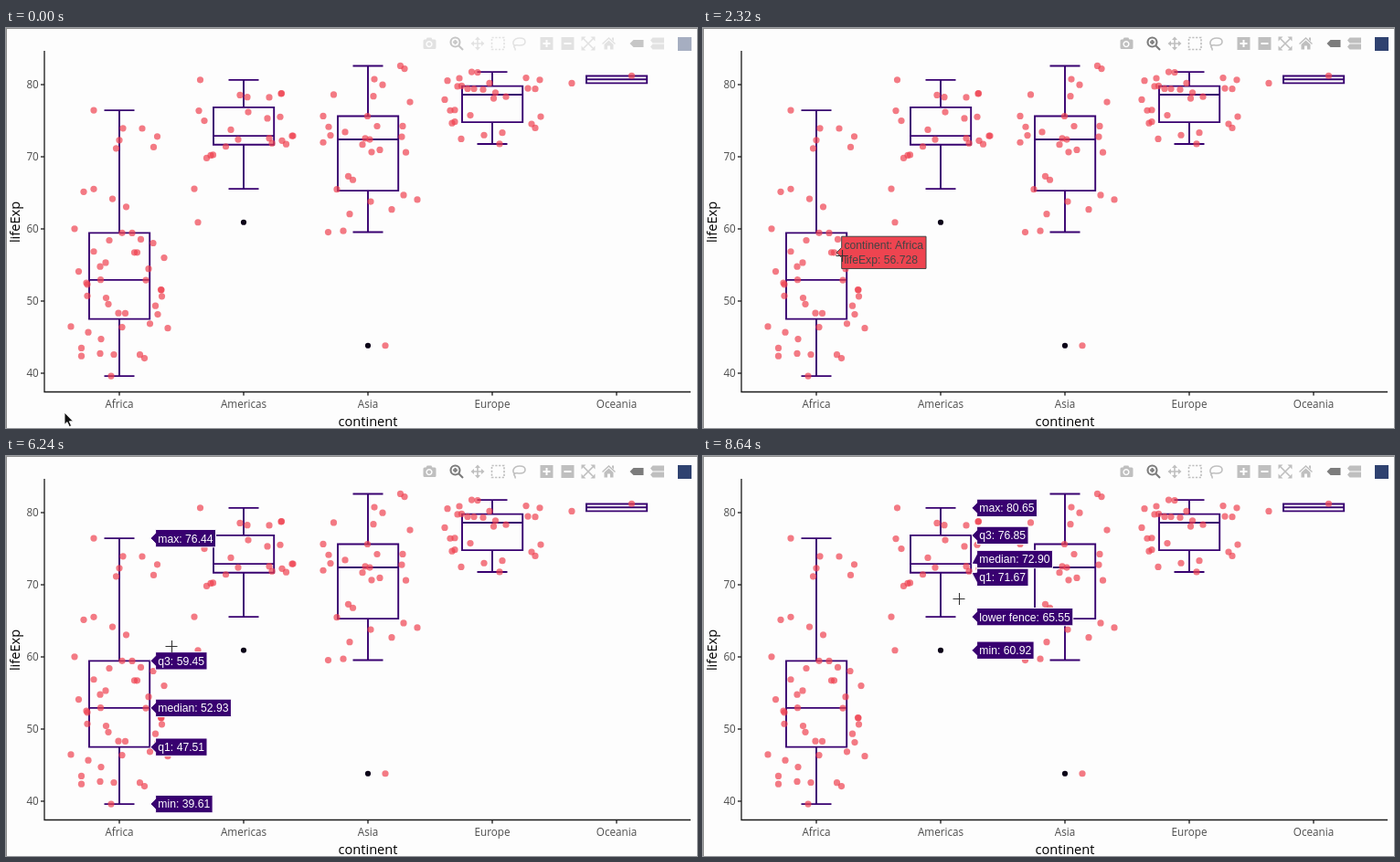
An HTML page that plays this animation: 756x438 px, repeating every 8.72 s.

```html
<!DOCTYPE html>
<html lang="en">
<head>
<meta charset="utf-8">
<title>Life expectancy by continent</title>
<style>
  html, body { margin: 0; width: 100%; height: 100%; overflow: hidden; background: #fdfdfd; }
  svg { display: block; }
  .tick { font: 11.7px "Open Sans", sans-serif; fill: #4d4d4d; }
  .title { font: 14.6px "Open Sans", sans-serif; fill: #000; }
  .mid { text-anchor: middle; }
  .end { text-anchor: end; }
  .tip { font: 12.2px "Liberation Sans", Arial, sans-serif; }
  .axis { stroke: #1a1a1a; stroke-width: 1.3; fill: none; }
  .box { stroke: #380070; stroke-width: 1.9; fill: none; }
  .dot { fill: #ee4250; fill-opacity: .7; }
  .icon { fill: #bfbfbf; stroke: none; }
  .icon .line { fill: none; stroke: #bfbfbf; stroke-width: 1.6; }
  .icon .on { fill: #7c7c7c; }
  .icon .on.line { fill: none; stroke: #7c7c7c; stroke-width: 2.1; }
  .icon .cut { fill: none; stroke: #fdfdfd; stroke-width: 2; }
</style>
</head>
<body>
<svg id="stage" width="756" height="438" viewBox="0 0 756 438">
  <path d="M0 .5H756M.5 0V438" stroke="#8c8c8c" fill="none"/>
  <g id="plot"></g>
  <g id="bar" class="icon">
    <path fill-rule="evenodd" d="M457 12.5h2.5l1.2-2h4.6l1.2 2h2.5q1.5 0 1.5 1.5v7.5q0 1.5-1.5 1.5h-11q-1.5 0-1.5-1.5v-7.5q0-1.5 1.5-1.5zM463 14a3.6 3.6 0 1 0 .01 0zm0 1.5a2.1 2.1 0 1 1-.01 0z"/>
    <circle class="line on" cx="491.5" cy="15.5" r="5"/>
    <path class="line on" d="M495 19l5 5M489 15.5h5M491.5 13v5"/>
    <path class="line" d="M510 17h12M516 11v12"/>
    <path d="M508.500 17l3.500-3v6zM523.500 17l-3.500-3v6zM516 9.500l-3 3.500h6zM516 24.500l-3-3.500h6z"/>
    <rect class="line" x="531.5" y="10.500" width="13.500" height="13" stroke-dasharray="2.200 1.600"/>
    <path class="line" d="M557 20c-4-3-2-9 5-9 8 0 8 8 0 8-3 0-5-1-6 .5-1 2 2 2 1 5"/>
    <path d="M584.500 10h14v14h-14zM607.500 10h14v14h-14z"/>
    <path class="cut" d="M587.500 17h8M591.500 13v8M610.500 17h8"/>
    <path d="M629.500 9.500h5l-5 5zM644.500 9.500h-5l5 5zM629.500 24.500h5l-5-5zM644.500 24.500h-5l5-5z"/>
    <path class="line" d="M632 12l10 10M642 12l-10 10"/>
    <path d="M659.500 10l7.500 7-1 1-6.500-6-6.500 6-1-1zM654.500 18l5-4.500 5 4.500v5.500h-3.500v-4h-3v4h-3.500zM663 10.500h2v4l-2-2z"/>
    <path class="on" d="M682.500 17l4-4h11v8h-11z"/>
    <path d="M705 13.500l2.500-3h12.500v6h-12.500zM705 20.500l2.500-3h12.500v6h-12.500z"/>
    <rect x="735" y="10" width="15" height="15" fill="#2f4270"/>
  </g>
  <g id="hover"></g>
  <path id="arrow" d="M0 0v13.300l3-2.700 2.300 5 2.300-1-2.300-4.800h4.200z" fill="#111" stroke="#fff" stroke-width=".9"/>
  <path id="cross" d="M-6.500 .5h13M.5-6v13" stroke="#333" stroke-width="1.100" fill="none"/>
</svg>
<script>
const LOOP = 8720, STEP = 80, REACH = 23.7, RED = '#ee4450', PURPLE = '#380070';
const $ = id => document.getElementById(id);
const yOf = v => 62 + (80 - v) * 7.9;

// stats: max, q3, median, q1, low whisker, outlier; pts: x, value pairs
const groups = [
  { name: 'Africa', x: 124, stats: [76.44, 59.45, 52.93, 47.51, 39.61], pts: [
    124, 72.301, 103, 42.731, 143.5, 56.728, 89, 50.728, 89, 52.295, 112, 49.58, 109.5, 50.43,
    104, 44.741, 170.5, 50.651, 85, 65.152, 71, 46.462, 109, 55.322, 123, 48.328, 103, 54.791,
    161.5, 71.338, 169.5, 51.579, 161, 58.04, 103.5, 52.947, 140.5, 56.735, 127, 59.448,
    75, 60.022, 173, 56.007, 127, 46.388, 79.5, 54.11, 118, 42.592, 90, 45.678, 128, 73.952,
    138, 59.443, 130.5, 48.303, 156, 54.467, 116.5, 64.164, 165.5, 72.801, 120.5, 71.164,
    151.5, 42.082, 153, 52.906, 96, 56.867, 157.5, 46.859, 96, 76.442, 177, 46.242, 96, 65.528,
    131.5, 63.062, 146.5, 42.568, 166, 48.159, 163.5, 49.339, 147.5, 58.556, 115, 39.613,
    88, 52.517, 113, 58.42, 149, 73.923, 170, 51.542, 82.5, 42.384, 82.5, 43.487] },
  { name: 'Americas', x: 260, stats: [80.65, 76.85, 72.9, 71.67, 65.55, 60.92], pts: [
    286, 75.32, 206, 65.554, 254, 72.39, 212.5, 80.653, 256, 78.553, 313, 72.889, 301.5, 78.782,
    264, 78.273, 302, 72.235, 217, 74.994, 291, 71.878, 226.5, 70.259, 210, 60.916, 224, 70.198,
    288, 72.567, 265, 76.195, 314, 72.899, 300, 75.537, 306.5, 71.752, 240.5, 71.421,
    301, 78.746, 219.5, 69.819, 288, 78.242, 211, 76.384, 246, 73.747] },
  { name: 'Asia', x: 396, stats: [82.6, 75.64, 72.4, 65.3, 59.55, 43.83], pts: [
    415, 43.828, 395.5, 75.635, 450, 64.062, 369, 59.723, 355, 72.961, 436, 82.208, 435, 64.698,
    400, 70.65, 409, 70.964, 352.5, 59.545, 403, 80.745, 431.5, 82.603, 393, 72.535,
    374.5, 67.297, 358.5, 78.623, 442, 77.588, 347, 71.993, 353, 74.143, 379.5, 66.803,
    376, 62.069, 399, 63.785, 347, 75.64, 362, 65.483, 390, 71.688, 433, 72.777, 412, 79.972,
    398, 72.396, 406, 74.241, 402, 78.4, 437.5, 70.616, 434, 74.249, 371, 73.422, 422, 62.698] },
  { name: 'Europe', x: 532, stats: [81.76, 79.8, 78.6, 74.8, 71.78], pts: [
    486, 76.423, 498.5, 79.829, 505, 79.441, 491, 74.852, 523, 73.005, 508, 75.748, 491, 76.486,
    547, 78.332, 522, 79.313, 584, 80.657, 579, 79.406, 571, 79.483, 543, 73.338, 509.5, 81.757,
    535.5, 78.885, 483, 80.546, 575, 74.543, 494, 79.762, 529, 80.196, 585, 75.563,
    533.5, 78.098, 498, 72.476, 579, 74.002, 488, 74.663, 480, 77.926, 569, 80.941,
    496, 80.884, 516, 81.701, 540, 71.777, 512, 79.425] },
  { name: 'Oceania', x: 668, stats: [81.24, 81.2, 80.72, 80.2, 80.2], pts: [684.5, 81.235, 619, 80.204] }
];

// cursor track: time, x, y
const track = [[0, 64, 421], [320, 80, 396], [720, 107, 330], [1040, 114, 309], [1440, 122, 300],
  [1920, 144, 262], [2320, 152, 249], [3200, 152, 249], [3920, 168, 240], [4640, 187, 233],
  [5120, 184, 215], [6240, 181, 208], [6720, 200, 190], [7440, 230, 163], [8000, 256, 160],
  [8640, 280, 156], [LOOP, 280, 156]];

function add(parent, tag, attrs, text) {
  const el = document.createElementNS('http://www.w3.org/2000/svg', tag);
  for (const k in attrs) el.setAttribute(k, attrs[k]);
  if (text !== undefined) el.textContent = text;
  parent.appendChild(el);
  return el;
}

function drawPlot() {
  const plot = $('plot');
  for (const g of groups) {
    const [top, q3, med, q1, low, out] = g.stats.map(yOf), l = g.x - 33, r = g.x + 33.2;
    const cap = y => `M${g.x - 16.5} ${y}h33`;
    const body = `M${l} ${q3}H${r}V${q1}H${l}ZM${l} ${med}H${r}`;
    const whiskers = top < q3 - 1 ? `M${g.x} ${top}V${q3}M${g.x} ${q1}V${low}${cap(top)}${cap(low)}` : '';
    add(plot, 'path', { class: 'box', d: body + whiskers });
    if (out) add(plot, 'circle', { cx: g.x, cy: out, r: 3.1, fill: '#0c0418' });
  }
  for (const g of groups) {
    for (let i = 0; i < g.pts.length; i += 2)
      add(plot, 'circle', { class: 'dot', cx: g.pts[i], cy: yOf(g.pts[i + 1]), r: 3.6 });
    add(plot, 'path', { class: 'axis', d: `M${g.x} 398.500v4` });
    add(plot, 'text', { class: 'tick mid', x: g.x, y: 416 }, g.name);
  }
  for (let v = 40; v <= 80; v += 10) {
    add(plot, 'path', { class: 'axis', d: `M42 ${yOf(v)}h-4` });
    add(plot, 'text', { class: 'tick end', x: 35.8, y: yOf(v) + 4.2 }, v);
  }
  add(plot, 'path', { class: 'axis', d: 'M42 25V398.500H749' });
  add(plot, 'text', { class: 'title mid', x: 396, y: 435.5 }, 'continent');
  add(plot, 'text', { class: 'title mid', transform: 'translate(15 212.500) rotate(-90)' }, 'lifeExp');
}

// Speech-box label whose arrow touches (x, y); shift moves only its body.
function label(x, y, lines, fill, ink, edge, shift = 0) {
  const box = add($('hover'), 'path', { fill, stroke: edge, 'stroke-width': 1 });
  const h = lines.length > 1 ? 17.6 : 9.7;
  let w = 0;
  lines.forEach((s, i) => {
    const base = y + shift + 4.4 + (i - (lines.length - 1) / 2) * 16;
    const t = add($('hover'), 'text', { class: 'tip', x: x + 8.3, y: base, fill: ink }, s);
    w = Math.max(w, t.getComputedTextLength() + 5.6);
  });
  box.setAttribute('d', `M${x} ${y}l5.600 ${shift - 5.6}V${y + shift - h}h${w}v${2 * h}h${-w}V${y + shift + 5.6}Z`);
}

function boxLabels(g) {
  const names = ['max', 'q3', 'median', 'q1', g.stats[5] ? 'lower fence' : 'min', 'min'];
  const ys = g.stats.map(yOf), shift = ys.map(() => 0);
  for (let i = 1; i < ys.length; i++) {
    const push = (19.8 - ys[i] + ys[i - 1]) / 2;
    if (push > 0) { shift[i - 1] -= push; shift[i] += push; }
  }
  g.stats.forEach((v, i) =>
    label(g.x + 34, ys[i], [`${names[i]}: ${v.toFixed(2)}`], PURPLE, '#fff', '#fff', shift[i]));
}

function findHover(x, y) {
  let best = { d: REACH };
  for (const g of groups)
    for (let i = 0; i < g.pts.length; i += 2) {
      const d = Math.hypot(g.pts[i] - x, yOf(g.pts[i + 1]) - y);
      if (d < best.d) best = { d, g, x: g.pts[i], v: g.pts[i + 1] };
    }
  if (best.g) return best;
  const g = groups.find(k => Math.abs(k.x - x) < 68 && y > yOf(k.stats[0]) && y < yOf(Math.min(...k.stats)));
  return g && { g };
}

function cursorAt(t) {
  const i = track.findIndex(k => k[0] > t), a = track[i - 1], b = track[i];
  const p = (t - a[0]) / (b[0] - a[0]);
  return [1, 2].map(n => Math.round(a[n] + (b[n] - a[n]) * p));
}

let shown = '';
function frame() {
  const t = Math.floor(performance.now() % LOOP / STEP) * STEP;
  const [x, y] = cursorAt(t), inside = y < 398;
  $('bar').setAttribute('opacity', Math.min(1, 0.42 + t / 280));
  $('arrow').style.display = inside ? 'none' : '';
  $('cross').style.display = inside ? '' : 'none';
  $(inside ? 'cross' : 'arrow').setAttribute('transform', `translate(${x} ${y})`);

  const hit = inside && findHover(x, y);
  const key = hit ? `${hit.g.name} ${hit.x} ${hit.v}` : '';
  if (key !== shown) {
    shown = key;
    $('hover').replaceChildren();
    if (hit && hit.v)
      label(hit.x + 2.6, yOf(hit.v), [`continent: ${hit.g.name}`, `lifeExp: ${hit.v.toFixed(3)}`], RED, '#444', '#444');
    else if (hit) boxLabels(hit.g);
  }
  requestAnimationFrame(frame);
}

drawPlot();
frame();
</script>
</body>
</html>
```
